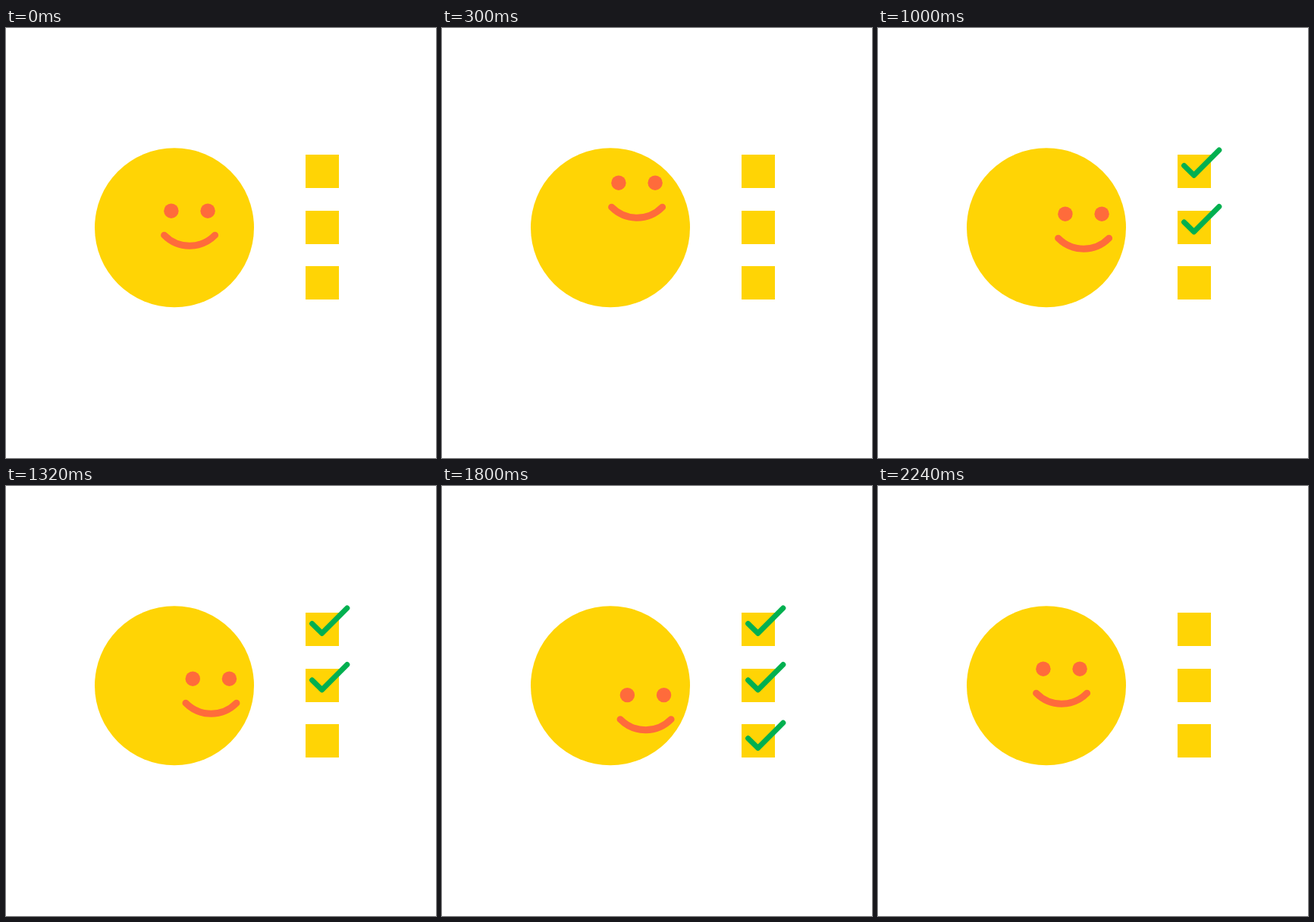
Animation, 567 px wide and 567 px high, one loop 2420 ms. Source, as an HTML page:

```html
<!DOCTYPE html>
<html lang="en">
<head>
<meta charset="utf-8">
<title>Checklist</title>
<style>
  html, body { margin: 0; width: 100%; height: 100%; overflow: hidden; background: #fff; }
  svg { display: block; width: 100%; height: 100%; }
  .line { fill: none; stroke-linecap: round; stroke-linejoin: round; }
  .check { stroke: #00b050; stroke-width: 7; }
</style>
</head>
<body>
<svg viewBox="0 0 567 567">
  <g fill="#ffd405">
    <circle cx="222" cy="263.2" r="105"/>
    <path d="M395 167h44v44h-44zM395 241h44v44h-44zM395 314h44v44h-44z"/>
  </g>
  <g id="face" fill="#ff6b3b">
    <circle cx="217.9" cy="241.2" r="9.7"/>
    <circle cx="266.1" cy="241.2" r="9.7"/>
    <path class="line" stroke="#ff6b3b" stroke-width="9" d="M208.6 273.2A47 47 0 0 0 275.6 273.2"/>
  </g>
  <path class="line check" pathLength="1" d="M403.6 181.4L416.6 194.2L449.8 161"/>
  <path class="line check" pathLength="1" d="M403.6 255.9L416.6 268.7L449.8 235.5"/>
  <path class="line check" pathLength="1" d="M403.6 332.7L416.6 345.5L449.8 312.3"/>
</svg>
<script>
const LOOP = 2420, STEP = 20;
const face = document.getElementById('face');
const checks = document.querySelectorAll('.check');

// Each move: start, duration, then the offset the face travels to.
const moves = [
  [0, 300, 15, -37],
  [700, 300, 29, 4],
  [1220, 280, 26.8, 34.9],
  [1780, 300, 0, 0]
];
const drawStart = [340, 880, 1520], drawTime = 120;
const eraseStart = 2100, eraseTime = 140;

const progress = (t, start, time) => Math.min(1, Math.max(0, (t - start) / time));
const ease = p => p * p * (3 - 2 * p);

function render(t) {
  let x = 0, y = 0;
  for (const [start, time, toX, toY] of moves) {
    const p = ease(progress(t, start, time));
    x += (toX - x) * p;
    y += (toY - y) * p;
  }
  face.setAttribute('transform', `translate(${x} ${y})`);

  const left = 1 - progress(t, eraseStart, eraseTime);
  checks.forEach((check, i) => {
    const shown = Math.min(progress(t, drawStart[i], drawTime), left);
    check.style.visibility = shown > 0 ? 'visible' : 'hidden';
    check.style.strokeDasharray = shown < 1 ? `${shown} 2` : 'none';
  });
}

function tick() {
  render(Math.floor(performance.now() % LOOP / STEP) * STEP);
  requestAnimationFrame(tick);
}
tick();
</script>
</body>
</html>
```
